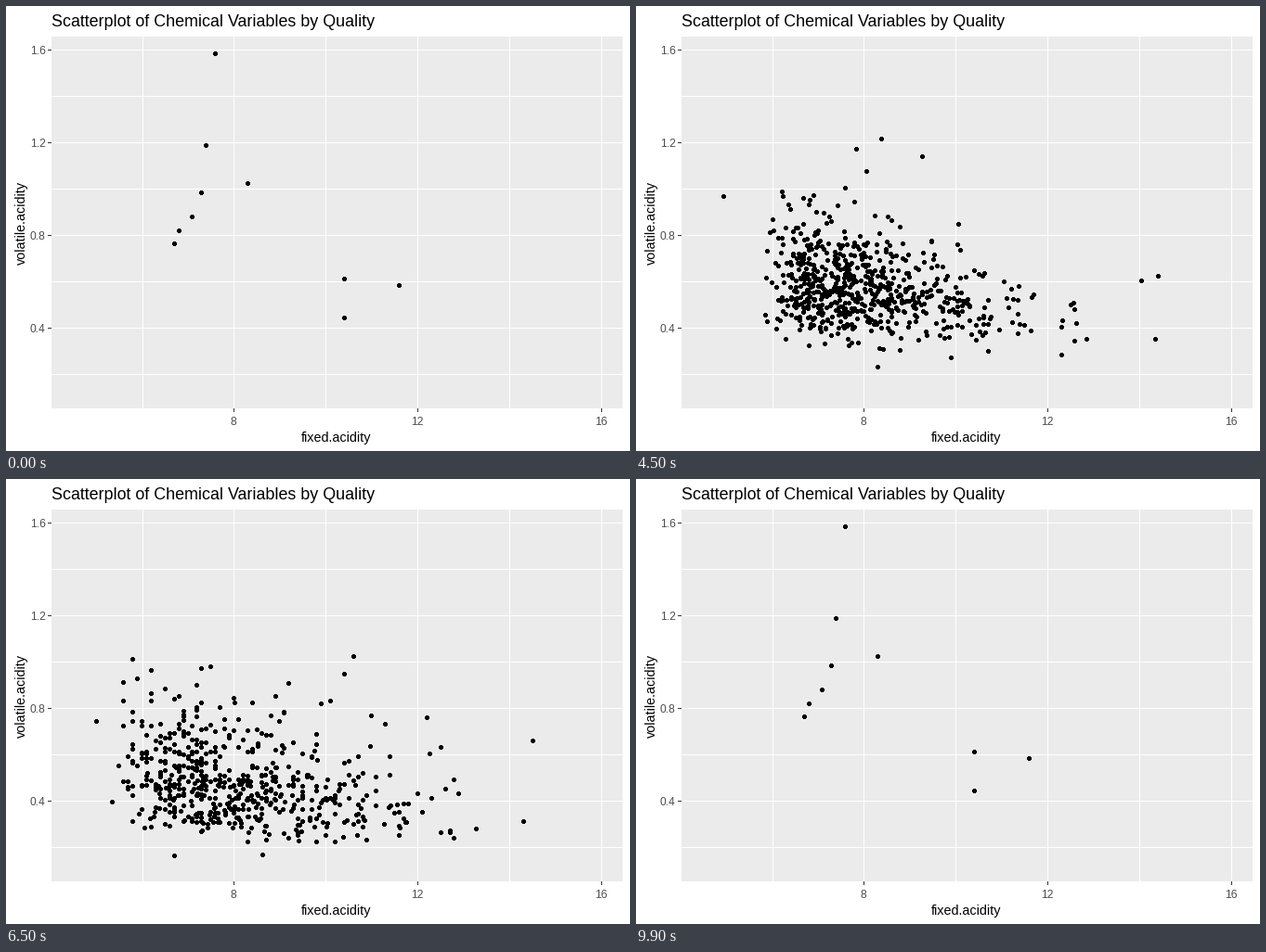
A matplotlib script for the animation above (10000 ms loop, 672 px wide and 480 px high).

```python
import numpy as np
import matplotlib.pyplot as plt
from matplotlib.animation import FuncAnimation
from matplotlib.collections import PolyCollection
from matplotlib.patches import Rectangle

W, H, DPI = 672, 480, 96
FRAMES, INTERVAL = 100, 100
STARTS = (11, 28, 45, 61, 78, 94)   # first moving frame of each transition
STEPS = 6
LEFT, TOP, RIGHT, BOTTOM = 49, 33, 664, 434


def to_px(x, y):
    return 245.48 + (x - 8) * 49.48, 346.57 - (y - 0.4) * 249.7


# ---- data: one point set per quality grade ----

def cloud(seed, n, x_gamma, y_line, x_max, y_range, keys):
    """Skewed cloud on the measuring grid, with a few key points spread through it.

    Acidity drifts slowly along the rows, and some rows repeat the one before.
    """
    rng = np.random.default_rng(seed)
    x0, shape, scale = x_gamma
    mid, slope, spread = y_line
    pts = []
    while len(pts) < n:
        if pts and rng.random() < 0.13:
            pts.append(pts[-1])
            continue
        drift = 1 + 0.3 * np.sin(2 * np.pi * (len(pts) / n - 0.12))
        x = round(x0 + rng.gamma(shape, scale) * drift, 1)
        y = (mid + slope * (x - 8)) * np.exp(rng.normal(0, spread))
        y = round(y, 2) + 0.005 * (rng.random() < 0.2)
        if x <= x_max and y_range[0] <= y <= y_range[1]:
            pts.append((x, y))
    pts = np.array(pts)
    rows = 12 + np.arange(len(keys)) * (n - 12) // len(keys)
    pts[rows] = keys
    return pts


STATES = [
    np.array([(11.6, .58), (10.4, .61), (7.4, 1.185), (10.4, .44), (8.3, 1.02),
              (7.6, 1.58), (6.8, .815), (7.3, .98), (7.1, .875), (6.7, .76)]),
    cloud(4, 53, (4.9, 3.6, .8), (.68, -.04, .33), 12.1, (.33, 1.12),
          [(4.6, .52), (5.7, 1.13), (12.5, .46), (10.2, .23), (10.1, .935),
           (5.0, 1.02)]),
    cloud(5, 681, (5.6, 2.6, .93), (.57, -.035, .26), 13.3, (.2, 1.07),
          [(5.0, 1.04), (8.1, 1.33), (8.2, 1.33), (8.0, 1.18), (9.8, 1.24),
           (7.9, .18), (15.5, .645), (15.6, .645), (15.9, .36)]),
    cloud(6, 638, (5.2, 3.0, 1.0), (.49, -.025, .3), 13.2, (.18, .98),
          [(4.7, .6), (6.3, 1.04), (6.6, .96), (5.0, .74), (5.8, 1.01),
           (10.6, 1.02), (12.2, .755), (14.3, .31), (6.7, .16)]),
    cloud(7, 199, (5.0, 4.0, .95), (.4, -.025, .32), 13.3, (.18, .84),
          [(15.0, .21), (4.9, .42), (7.7, .915), (8.9, .12), (11.9, .695),
           (12.8, .615), (15.6, .685)]),
    cloud(8, 18, (5.2, 3.5, .95), (.4, -.02, .25), 11.5, (.3, .7),
          [(7.9, .54), (5.0, .42), (12.6, .31), (5.6, .85), (10.0, .26)]),
]


def points_at(frame):
    """Rows pair by index; unpaired ones leave or arrive at the end."""
    step = STEPS
    state = 0
    for i, start in enumerate(STARTS):
        if frame >= start:
            state, step = i, frame - start + 1
    if frame < STARTS[0]:
        return STATES[0]
    old, new = STATES[state], STATES[(state + 1) % len(STATES)]
    if step >= STEPS:
        return new
    n = min(len(old), len(new))
    pts = old.copy()
    pts[:n] += (new[:n] - old[:n]) * step / STEPS
    return pts


# ---- static plot ----

fig = plt.figure(figsize=(W / DPI, H / DPI), dpi=DPI, facecolor="white")
ax = fig.add_axes([0, 0, 1, 1])
ax.set_xlim(0, W)
ax.set_ylim(H, 0)
ax.axis("off")


def box(x, y, w, h, color):
    ax.add_patch(Rectangle((x, y), w, h, fc=color, lw=0, aa=False))


def label(x, y, s, size, color="black", **kw):
    ax.text(x, y, s, fontsize=size * 72 / DPI, color=color,
            family="Liberation Sans", va="baseline", **kw)


box(LEFT, TOP, RIGHT - LEFT, BOTTOM - TOP, "#EBEBEB")

for v in range(6, 17, 2):
    x = round(to_px(v, 0)[0])
    box(x, TOP, 1, BOTTOM - TOP, "white")
    if v % 4 == 0:
        box(x, BOTTOM, 1, 4, "#333333")
        label(x - 0.5, 452, str(v), 12, "#4D4D4D", ha="center")

for tenths in range(2, 17, 2):
    y = round(to_px(0, tenths / 10)[1])
    box(LEFT, y, RIGHT - LEFT, 1, "white")
    if tenths % 4 == 0:
        box(LEFT - 4, y, 4, 1, "#333333")
        label(42.5, y + 4.5, f"{tenths / 10:.1f}", 12, "#4D4D4D", ha="right")

label(49, 22, "Scatterplot of Chemical Variables by Quality", 17.9)
label(356, 470, "fixed.acidity", 14.4, ha="center")
label(20.5, 233.5, "volatile.acidity", 14.4, ha="center",
      rotation=90, rotation_mode="anchor")

# ---- moving dots ----

# 5 px disc: a square with its corner pixels cut off
DOT = np.array([(-1.5, -2.5), (1.5, -2.5), (1.5, -1.5), (2.5, -1.5),
                (2.5, 1.5), (1.5, 1.5), (1.5, 2.5), (-1.5, 2.5),
                (-1.5, 1.5), (-2.5, 1.5), (-2.5, -1.5), (-1.5, -1.5)])

dots = PolyCollection([], facecolors="black", linewidths=0,
                      antialiaseds=False, snap=False, zorder=5)
ax.add_collection(dots, autolim=False)


def draw(frame):
    x, y = to_px(*points_at(frame).T)
    centres = np.floor(np.column_stack([x, y])) + 0.5
    dots.set_verts(centres[:, None] + DOT)
    return [dots]


anim = FuncAnimation(fig, draw, frames=FRAMES, interval=INTERVAL,
                     repeat=True, repeat_delay=0)
plt.show()
```
